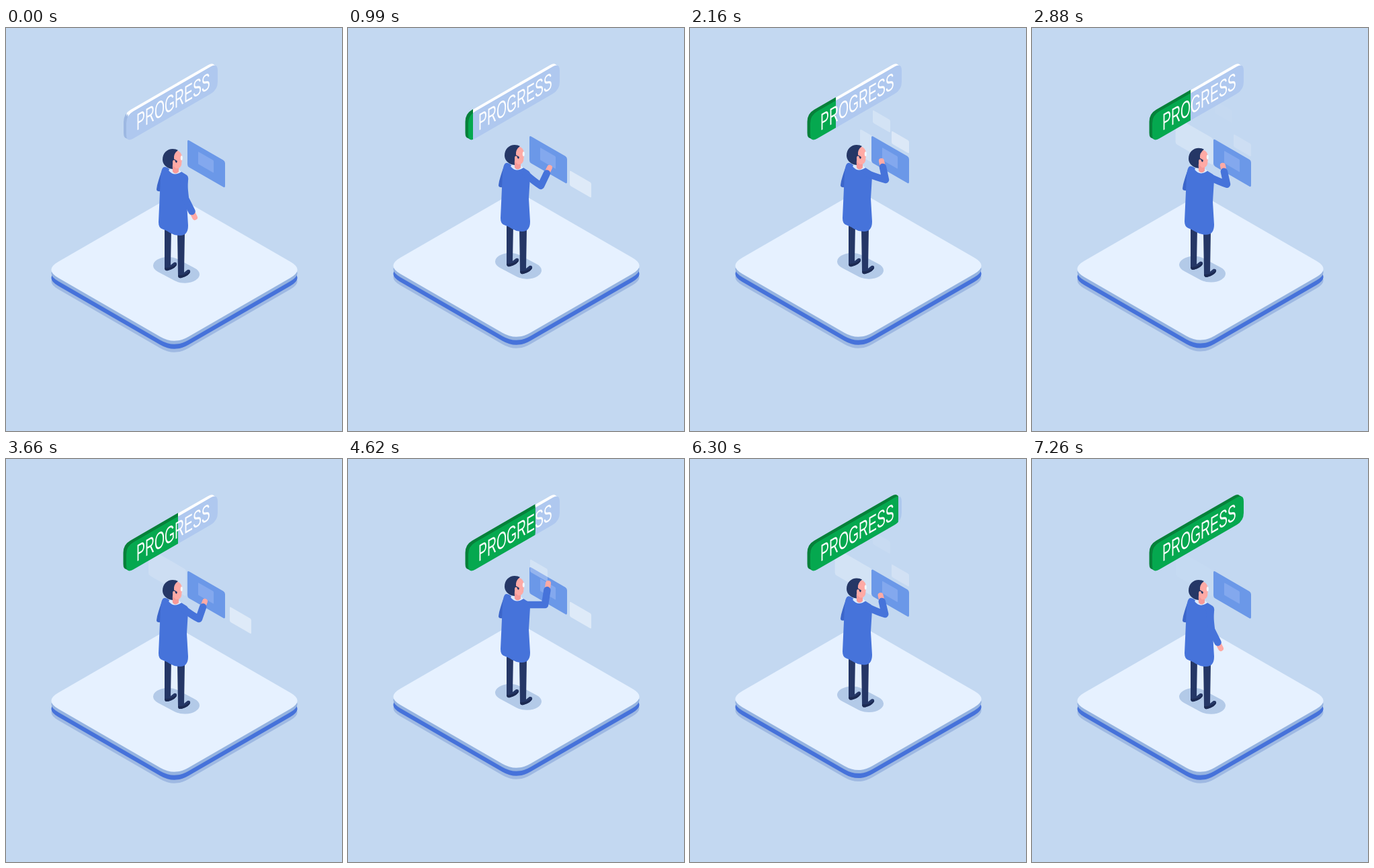
An HTML page that plays this animation: 500x600 px, repeating every 7.29 s.

```html
<!DOCTYPE html>
<html lang="en">
<head>
<meta charset="utf-8">
<title>Progress</title>
<style>
html, body { margin: 0; width: 100%; height: 100%; overflow: hidden; background: #c3d8f1; }
svg { display: block; width: 100vw; height: 100vh; }
text { font: 35px "Liberation Sans", Arial, sans-serif; fill: #fff; }
.limb { fill: none; stroke-linecap: round; stroke-linejoin: round; }
</style>
</head>
<body>
<svg viewBox="0 0 500 600">
  <defs>
    <path id="slab"/>
    <path id="sign"/>
    <linearGradient id="rim" gradientUnits="userSpaceOnUse" x1="175" y1="0" x2="315" y2="0">
      <stop offset=".055" stop-color="#9db8e2"/>
      <stop offset=".065" stop-color="#fff"/>
    </linearGradient>
    <clipPath id="filled"><rect id="fill" x="160" y="30" width="0" height="160"/></clipPath>
  </defs>

  <g id="scene">
    <use href="#slab" y="17" fill="#9fb9e2"/>
    <use href="#slab" y="12" fill="#4672da"/>
    <use href="#slab" y="5" fill="#95b3e0"/>
    <use href="#slab" fill="#e6f1ff"/>
    <path class="limb" d="M241 613L266 636" transform="scale(1 .577)" stroke="#b3cae8" stroke-width="44"/>

    <path id="leftTile" fill="#fff"/>
    <path id="panel" fill="#6b98e8"/>
    <path id="inset" fill="#83a8ee"/>
    <path id="rightTile" fill="#fff"/>
    <path id="topTile" fill="#fff"/>
    <path id="midTile" fill="#fff"/>

    <g fill="#253766">
      <path d="M236 298h10l-1 55 5-4q5-1 4 4-4 6-13 8-5 1-5-4z"/>
      <path d="M255 304h11l-1 60 5-4q5-1 4 4-4 6-13 8-5 1-5-4z"/>
      <path d="M236 357q9 1 18-6 0 6-13 10-5 1-5-4zM256 368q9 1 18-6 0 6-13 10-5 1-5-4z" fill="#1c2a52"/>
    </g>
    <path d="M233 210Q229 219 225 234L224 240Q224 244 231 243L236 225z" fill="#3c66ca"/>
    <path d="M235 207Q240 206 245 213Q251 219 261 214L269 219Q272 221 271 227L269 260L271 294Q271 309 259 309Q251 309 244 305Q238 301 232 299Q227 297 227 289L230 222Q231 208 235 207z" fill="#4673da"/>
    <path d="M242 212Q250 222 261 214L258 211L245 209z" fill="#dceaff"/>
    <path d="M247 203L248 214Q252 219 257 214L257 206z" fill="#f79a98"/>
    <path d="M252 182Q262 183 262 194L261 204Q259 210 253 209L246 203z" fill="#ffaaa5"/>
    <path d="M233 196C233 186 240 180 248 180Q253 180 256 182Q249 187 250 195L255 198L254 201L250 198Q247 202 248 210C239 209 233 203 233 196z" fill="#253766"/>
    <ellipse cx="250" cy="200" rx="2" ry="3.4" fill="#ffaaa5"/>
    <ellipse cx="261.3" cy="193.500" rx="1.500" ry="3.500" fill="#f4f8ff"/>

    <path id="hand" class="limb" stroke="#ffaaa5" stroke-width="8"/>
    <path id="arm" class="limb" stroke="#4673da" stroke-width="10.500"/>
  </g>

  <use href="#sign" x="-4" y="-2.300" fill="url(#rim)"/>
  <use href="#sign" x="-2" y="-1.150" fill="url(#rim)"/>
  <use href="#sign" fill="#afc8ef"/>
  <g clip-path="url(#filled)">
    <g fill="#07803a">
      <use href="#sign" x="-4.500" y="-2.600"/>
      <use href="#sign" x="-2" y="-1.150"/>
    </g>
    <use href="#sign" fill="#05a84f"/>
  </g>
  <text transform="matrix(.553 -.319 0 1 194 153)">PROGRESS</text>
</svg>

<script>
const LOOP = 7290, CYCLE = 3480, ISO = 0.577;
const $ = id => document.getElementById(id);
const mix = (a, b, k) => a + (b - a) * k;
const ramp = (t, from, to) => {
  const k = Math.min(1, Math.max(0, (t - from) / (to - from)));
  return k * k * (3 - 2 * k);
};

// Polygon with corners rounded over distance d
function rounded(points, d) {
  const n = points.length;
  const toward = (a, b) => {
    const k = d / Math.hypot(b[0] - a[0], b[1] - a[1]);
    return [mix(a[0], b[0], k), mix(a[1], b[1], k)];
  };
  return points.map((p, i) =>
    `${i ? "L" : "M"}${toward(p, points[(i + n - 1) % n])}Q${p} ${toward(p, points[(i + 1) % n])}`
  ).join("") + "Z";
}
const plate = (x, y, w, h, slope, d) =>
  rounded([[x, y], [x + w, y + slope * w], [x + w, y + slope * w + h], [x, y + h]], d);

$("slab").setAttribute("d", rounded([[57, 360], [250.5, 248.3], [444, 360], [250.5, 471.7]], 24));
$("sign").setAttribute("d", plate(179, 130, 136, 40.5, -ISO, 12));
const shapes = {
  panel: [270, 166, 56, 40, 3], leftTile: [270, 166, 56, 40, 3], inset: [286, 184, 23, 18.5, 1],
  rightTile: [330, 218, 32, 22.5, 2], topTile: [272, 128, 26, 19, 2], midTile: [300, 159, 26, 19, 2]
};
for (const [id, [x, y, w, h, d]] of Object.entries(shapes))
  $(id).setAttribute("d", plate(x, y, w, h, ISO, d));

function place(id, x, y, opacity) {
  $(id).setAttribute("transform", `translate(${x} ${y})`);
  $(id).setAttribute("opacity", opacity);
}

// Smooth curve through [time, ...values] keys
function along(keys, t) {
  let i = 0;
  while (i < keys.length - 2 && t > keys[i + 1][0]) i++;
  const a = keys[i], b = keys[i + 1], before = keys[i - 1] || a, after = keys[i + 2] || b;
  const span = b[0] - a[0], k = Math.min(1, Math.max(0, (t - a[0]) / span));
  return a.slice(1).map((v, j) => {
    const c = j + 1;
    const m0 = (b[c] - before[c]) / (b[0] - before[0]) * span;
    const m1 = (after[c] - a[c]) / (after[0] - a[0]) * span;
    return v + k * k * (3 - 2 * k) * (b[c] - v) + k * (1 - k) * ((1 - k) * m0 - k * m1);
  });
}

const fillKeys = [[0, 174], [990, 186], [2160, 217], [3660, 256], [4620, 278.5], [5490, 297], [6400, 311], [7200, 316]];
// time, hand x, hand y, elbow x, elbow y
const reach = [
  [0, 294, 212, 287, 238], [180, 296, 212, 287, 238], [860, 300, 215, 287, 241],
  [990, 300, 214, 287, 241], [1140, 298, 191, 293, 223], [1600, 298, 187, 294, 222],
  [2010, 282, 203, 291, 231], [2160, 285, 204, 291, 232], [2900, 284, 206, 290, 234],
  [CYCLE, 294, 212, 287, 238]
];
const rest = [281, 282, 267, 254];

function drawArm(t) {
  const raised = ramp(t, 100, 600) * (1 - ramp(t, 6500, 7100));
  const [hx, hy, ex, ey] = along(reach, t % CYCLE).map((v, i) => mix(rest[i], v, raised));
  const wx = mix(hx, ex, 0.32), wy = mix(hy, ey, 0.32);
  $("arm").setAttribute("d", `M264 223Q${mix(264, ex, 0.6)} ${mix(223, ey, 0.7)} ${ex} ${ey}L${wx} ${wy}`);
  $("hand").setAttribute("d", `M${wx} ${wy}L${hx} ${hy}`);
}

function drawTiles(t) {
  const p = t < CYCLE ? t : t - CYCLE;
  const q = t < 3880 ? t : t - CYCLE;
  const slide = -20 * (1 - ramp(p, 0, 180)) + 3 * ramp(p, 0, 180) - 3 * ramp(p, 180, 700);
  place("rightTile", slide, slide * ISO, 0.45 * ramp(p, 30, 180) * (1 - ramp(p, 1300, 1800)));
  place("topTile", -ramp(2010 - p, 0, 870), 27 - (p - 1140) * 0.0265,
    0.28 * ramp(p, 1000, 1130) * (1 - ramp(p, 2500, 3000)));
  place("midTile", 0, 10 * (1 - ramp(p, 1450, 1900)),
    0.42 * ramp(p, 1450, 1800) * (1 - ramp(p, 2600, 3100)));
  const [left] = along([[1700, 0], [2010, -12], [2160, -17], [2900, -57], [3660, -58], [3780, -56]], q);
  place("leftTile", left, left * ISO, 0.27 * ramp(q, 1700, 1950) * (1 - ramp(q, 3500, 3870)));
}

const start = performance.now();
function frame(now) {
  const t = Math.max(0, now - start) % LOOP;
  const bob = 4.17 * Math.cos((t + 247) / LOOP * 4 * Math.PI) - 3.8;
  $("scene").setAttribute("transform", `translate(0 ${bob})`);
  $("fill").setAttribute("width", along(fillKeys, t)[0] - 160);
  drawArm(t);
  drawTiles(t);
  requestAnimationFrame(frame);
}
frame(start);
</script>
</body>
</html>
```
